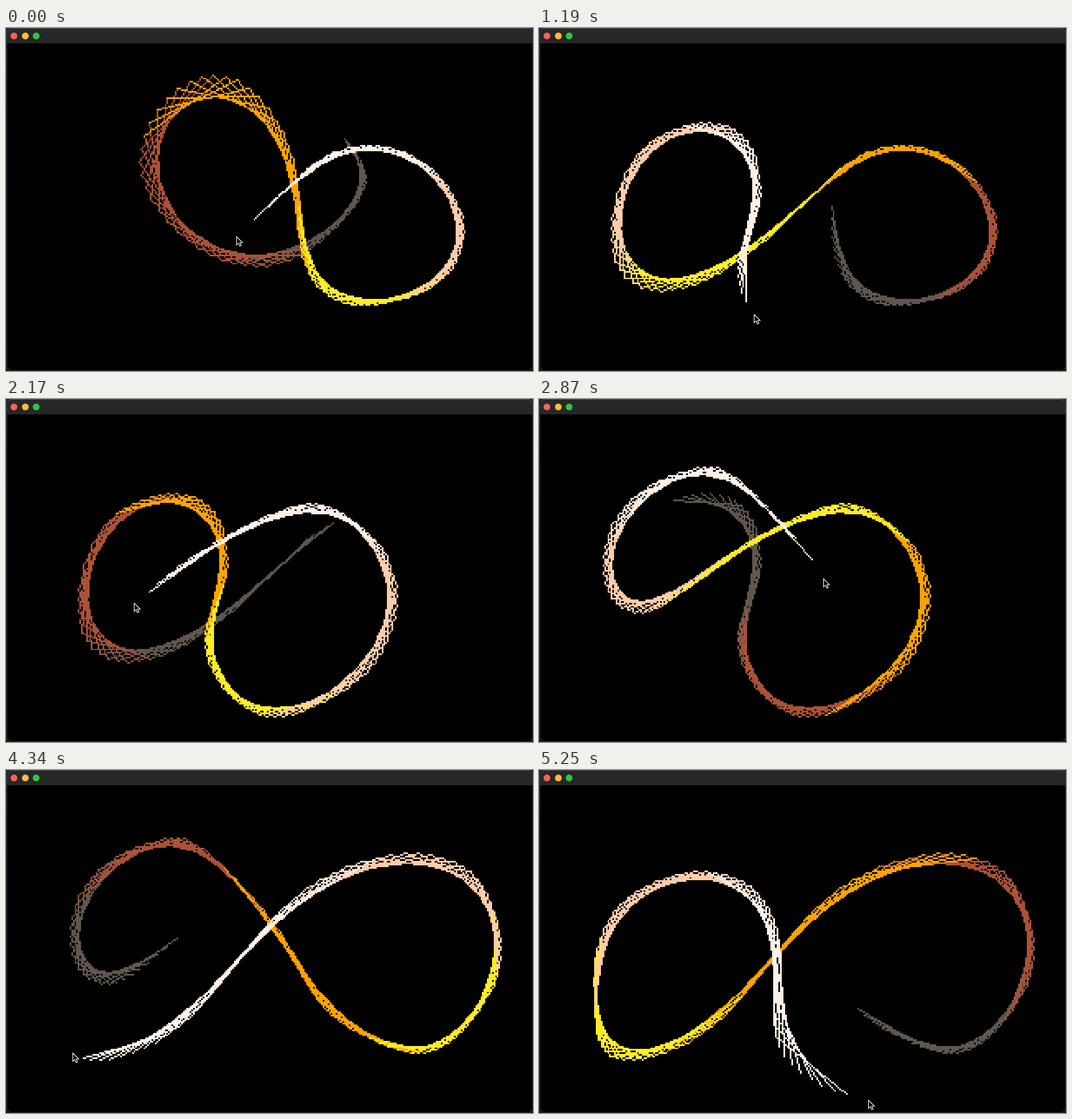
Animation of 927x604 px, one loop 5320 ms. Source, as an HTML page with a canvas:

```html
<!DOCTYPE html>
<html lang="en">
<head>
<meta charset="utf-8">
<title>Ribbon trail</title>
<style>
  html, body { margin: 0; width: 100%; height: 100%; overflow: hidden; }
  body { position: relative; background: linear-gradient(#1d2c45, #0b0b10 40%, #2b1214); }
  #win { position: absolute; inset: 0 0 0 1px; border-radius: 10px; overflow: hidden; background: #000; }
  #bar { height: 27px; background: #272727; }
  #bar i { position: absolute; top: 8px; width: 12px; height: 12px; border-radius: 50%; }
  #rim { position: absolute; inset: 0; border: 1px solid #3a3a3a; border-top-color: #5c5c5c; border-radius: 10px; }
  canvas { position: absolute; left: 1px; top: 27px; width: 925px; height: 577px; image-rendering: pixelated; }
  svg { position: absolute; left: 0; top: 0; overflow: visible; }
</style>
</head>
<body>
<div id="win">
  <div id="bar">
    <i style="left:7px;background:#ff5f57"></i>
    <i style="left:27px;background:#febc2e"></i>
    <i style="left:46px;background:#28c840"></i>
  </div>
  <canvas id="screen" width="320" height="200"></canvas>
  <div id="rim"></div>
</div>
<svg id="cursor" width="14" height="20">
  <path d="M.5 .5V15L3.9 11.9L6.2 17.2L8.8 16L6.5 11H11Z" fill="#000" stroke="#fff" stroke-width="1.2"/>
</svg>
<script>
const LOOP = 5320, STEP = 70;
const REACH = 8;       // samples spanned by one chord
const BAND = 20;       // chords per colour
const COLORS = ['#fff1e8', '#ffccaa', '#ffec27', '#ffa300', '#ab5236', '#5f574f'];

// Pointer positions, one every KNOT samples, starting at sample FIRST
const KNOT = 8, FIRST = -120;
const path = [
  [590,187], [631,250], [605,325], [480,416], [320,375], [237,213], [366,82], [499,208],
  [516,370], [568,473], [680,482], [778,433], [803,332], [738,240], [640,207], [540,240],
  [437,338], [275,452], [142,428], [144,273], [238,178], [357,188], [387,312], [349,425],
  [400,528], [505,555], [650,464], [684,310], [605,209], [500,191], [322,283], [195,374],
  [116,325], [150,190], [278,122], [372,160], [492,302], [560,420], [688,493], [778,480],
  [858,380], [860,250], [770,154], [575,180], [420,320], [285,468], [135,508], [99,420],
  [113,280], [222,190], [360,196], [425,320], [423,488], [562,577], [715,590]
];
// Newest sample number at given times
const times = [0, 1190, 2170, 2870, 3430, 4340, 5250];
const counts = [8, 68, 124, 167, 200, 248, 303];

// Tangents of the natural cubic spline, by relaxation
const slope = path.map(() => [0, 0]);
for (let pass = 0; pass < 40; pass++) {
  path.forEach((p, i) => {
    const a = path[i - 1] || p, b = path[i + 1] || p;
    const sides = (a !== p) + (b !== p);
    slope[i] = [0, 1].map(c => {
      const near = (slope[i - 1]?.[c] || 0) + (slope[i + 1]?.[c] || 0);
      return (3 * (b[c] - a[c]) - near) / (2 * sides);
    });
  });
}

function pointAt(n) {
  const u = (n - FIRST) / KNOT;
  const i = Math.max(0, Math.min(path.length - 2, Math.floor(u)));
  const s = u - i, r = 1 - s;
  return [0, 1].map(c =>
    path[i][c] * r * r * (1 + 2 * s) + path[i + 1][c] * s * s * (3 - 2 * s) +
    slope[i][c] * s * r * r - slope[i + 1][c] * s * s * r);
}

function sampleAt(t) {
  let i = 0;
  while (i < times.length - 2 && t >= times[i + 1]) i++;
  const part = (t - times[i]) / (times[i + 1] - times[i]);
  return Math.round(counts[i] + part * (counts[i + 1] - counts[i]));
}

const ctx = document.getElementById('screen').getContext('2d');
const cursor = document.getElementById('cursor');

const pixelAt = n => {
  const [x, y] = pointAt(n);
  return [Math.floor((x - 2) * 320 / 925), Math.floor((y - 27) * 200 / 577)];
};

function line([x, y], [x1, y1]) {
  const dx = Math.abs(x1 - x), dy = -Math.abs(y1 - y);
  const sx = Math.sign(x1 - x), sy = Math.sign(y1 - y);
  let err = dx + dy;
  for (;;) {
    ctx.fillRect(x, y, 1, 1);
    if (x === x1 && y === y1) return;
    const e = 2 * err;
    if (e >= dy) { err += dy; x += sx; }
    if (e <= dx) { err += dx; y += sy; }
  }
}

function draw(t) {
  const head = sampleAt(t);
  ctx.fillStyle = '#000';
  ctx.fillRect(0, 0, 320, 200);
  for (let age = BAND * COLORS.length - 1; age >= 0; age--) {
    ctx.fillStyle = COLORS[Math.floor(age / BAND)];
    line(pixelAt(head - age - REACH), pixelAt(head - age));
  }
  const [x, y] = pointAt(head + 1.8);
  cursor.style.transform = `translate(${Math.round(x)}px, ${Math.round(y)}px)`;
}

const start = performance.now();
let shown = -1;
function tick() {
  const t = (performance.now() - start) % LOOP;
  const now = Math.floor(t / STEP) * STEP;
  if (now !== shown) draw(shown = now);
  requestAnimationFrame(tick);
}
tick();
</script>
</body>
</html>
```
